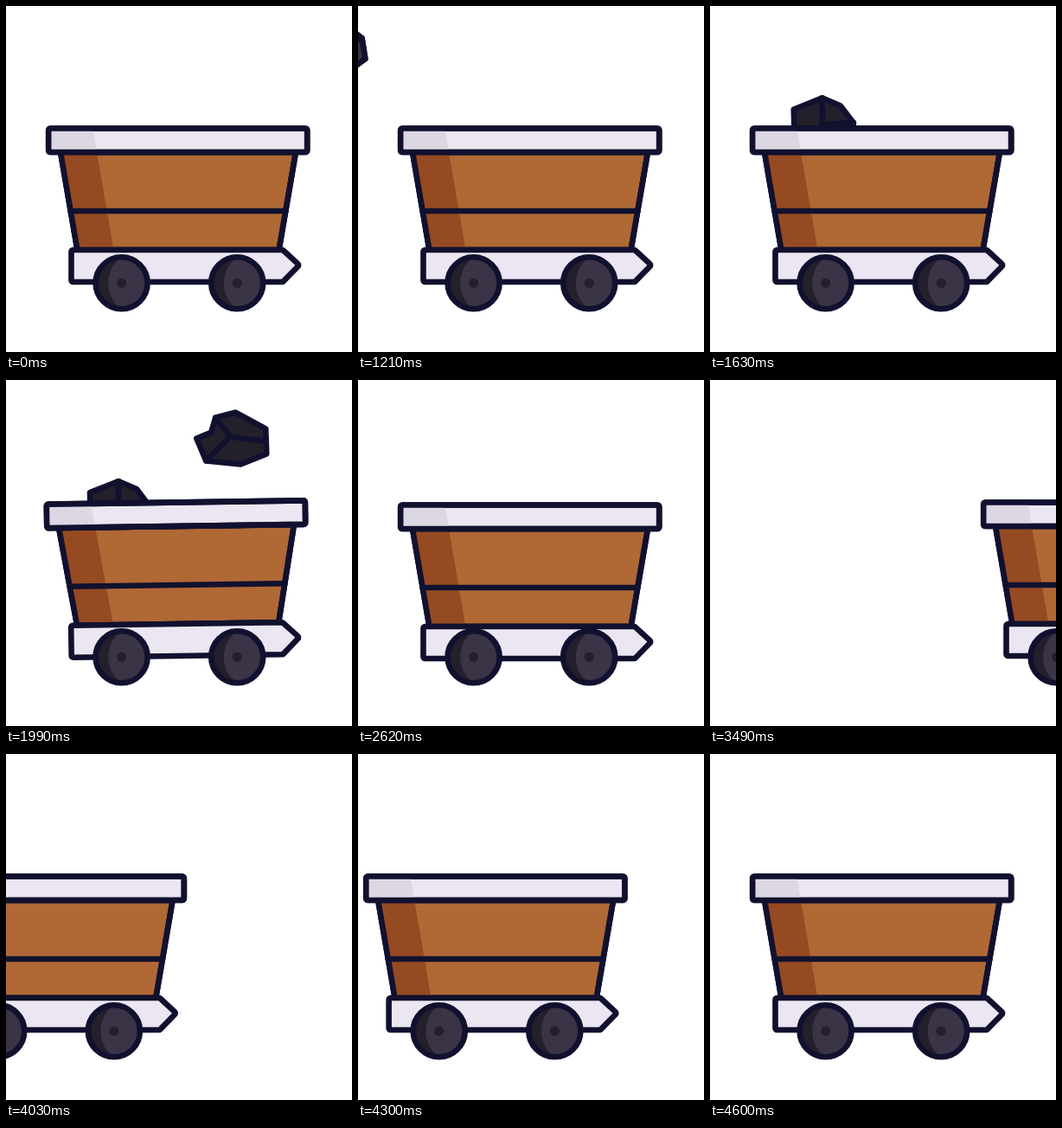
Animation of 400 by 400 pixels, one loop 4630 ms. Source, as an HTML page with a canvas:

```html
<!DOCTYPE html>
<html lang="en">
<head>
<meta charset="utf-8">
<title>Mine cart</title>
<style>
html, body { margin: 0; width: 100%; height: 100%; overflow: hidden; background: #fff; }
canvas { display: block; width: 100vmin; height: 100vmin; }
</style>
</head>
<body>
<canvas></canvas>
<script>
const LOOP = 4630;
const INK = '#11112f', PALE = '#ebe6f1', PALE_SHADE = '#ddd7e4';
const WOOD = '#b06835', WOOD_SHADE = '#964a22';
const COAL = '#231f2b', IRON = '#3b3346';

// Cart layout: heights of the main edges and the width of the shaded strip.
const RIM_TOP = 141.5, RIM_BOTTOM = 169, PLANK = 237, BASE_TOP = 282, BASE_BOTTOM = 319;
const MIDDLE = 199, SHADE = 42;

// Coal flight: time in the air and height where it settles.
const FLIGHT = 432, REST_Y = 150;

const canvas = document.querySelector('canvas');
const ctx = canvas.getContext('2d');
const scale = Math.min(3, window.devicePixelRatio || 1);
canvas.width = canvas.height = 400 * scale;

const clamp = u => Math.max(0, Math.min(1, u));
const mix = (a, b, u) => a + (b - a) * u;
const ease = (t, from, to) => {
  const u = clamp((t - from) / (to - from));
  return u * u * (3 - 2 * u);
};

// Closed polygon with optional rounded corners.
function polygon(points, color, { radius = 0, line = true } = {}) {
  const [ax, ay] = points[0], [bx, by] = points.at(-1);
  ctx.beginPath();
  ctx.moveTo((ax + bx) / 2, (ay + by) / 2);
  points.forEach(([x, y], i) => ctx.arcTo(x, y, ...points[(i + 1) % points.length], radius));
  ctx.closePath();
  ctx.fillStyle = color;
  ctx.fill();
  if (line) ctx.stroke();
}

function segment([x0, y0], [x1, y1]) {
  ctx.beginPath();
  ctx.moveTo(x0, y0);
  ctx.lineTo(x1, y1);
  ctx.stroke();
}

function ellipse(x, y, rx, ry, color) {
  ctx.beginPath();
  ctx.ellipse(x, y, rx, ry, 0, 0, Math.PI * 2);
  ctx.fillStyle = color;
  ctx.fill();
}

// Ridges run from the hub to corners; a half means the middle of an edge.
const leftRock = {
  corners: [[-33, -20], [0, -33], [21, -24], [36, -4], [34, 20], [5, 32], [-32, 22]],
  hub: [0, -2], ridges: [1, 3, 5], lit: true
};
const rightRock = {
  corners: [[-19, -25], [4, -31], [39, -12], [40, 17], [10, 29], [-30, 25], [-41, -1], [-24, -8]],
  hub: [-2, -3], ridges: [0, 2.5, 5]
};

function drawRock({ corners, hub, ridges, lit }, x, y, angle = 0) {
  const along = i => {
    const a = corners[Math.floor(i)], b = corners[Math.ceil(i)];
    return [(a[0] + b[0]) / 2, (a[1] + b[1]) / 2];
  };
  ctx.save();
  ctx.translate(x, y);
  ctx.rotate(angle);
  polygon(corners, COAL);
  if (lit) polygon([hub, ...corners.slice(ridges[1], ridges[2] + 1)], IRON);
  ridges.forEach(i => segment(hub, along(i)));
  ctx.restore();
}

function throwRock(rock, age, x0, x1, sunk, spin) {
  if (age < 0) return;
  const u = clamp(age / FLIGHT);
  const arc = 50 - 0.317 * age + 0.001257 * age * age;
  const x = mix(x0, x1, Math.sin(u * Math.PI / 2));
  drawRock(rock, x, Math.min(REST_Y, arc) + sunk, spin * (1 - u));
}

function dropRock(rock, age, x) {
  if (age < 0) return;
  drawRock(rock, x, Math.min(215, -40 + 0.55 * age + 0.0019 * age * age));
}

function drawRocks(t) {
  if (t > 2700) return;
  const sunk = 65 * ease(t, 2340, 2500);
  throwRock(leftRock, t - 1210, -30, 130, sunk, -0.24);
  throwRock(rightRock, t - 1690, 431, 240, sunk, 0);
  dropRock(rightRock, t - 2140, 195);
}

// The left wall leans inward; the right one mirrors it.
const leftWall = y => 63 + (y - RIM_BOTTOM) * 0.172;
const rightWall = y => 2 * MIDDLE - leftWall(y);
const shadeEdge = y => leftWall(y) + SHADE;
const band = (left, right, top, bottom) =>
  [[left(top), top], [right(top), top], [right(bottom), bottom], [left(bottom), bottom]];

function drawBody() {
  const rimLeft = () => 49.2, rimRight = () => 348.2;
  const flat = { line: false };

  polygon(band(leftWall, rightWall, RIM_BOTTOM, BASE_TOP), WOOD);
  polygon(band(leftWall, shadeEdge, RIM_BOTTOM, BASE_TOP), WOOD_SHADE, flat);
  polygon(band(leftWall, rightWall, RIM_BOTTOM, BASE_TOP), 'transparent');
  segment([leftWall(PLANK), PLANK], [rightWall(PLANK), PLANK]);

  const rim = band(rimLeft, rimRight, RIM_TOP, RIM_BOTTOM);
  polygon(rim, PALE, { radius: 2 });
  polygon(band(rimLeft, shadeEdge, RIM_TOP, RIM_BOTTOM), PALE_SHADE, flat);
  polygon(rim, 'transparent', { radius: 2 });

  const nose = [339, (BASE_TOP + BASE_BOTTOM) / 2 - 1];
  polygon([[75.5, BASE_TOP], [320, BASE_TOP], nose, [320, BASE_BOTTOM], [75.5, BASE_BOTTOM]],
    PALE, { radius: 2 });
}

function drawWheel(x) {
  const y = 320.3, r = 30;
  ellipse(x, y, r, r, COAL);
  ctx.save();
  ctx.clip();
  ellipse(x + 12.5, y, 28, 33, IRON);
  ctx.restore();
  ellipse(x, y, r, r, 'transparent');
  ctx.stroke();
  ellipse(x, y, 5.6, 5.6, COAL);
}

// Leans to the first rock, swings to the second, then levels out.
const tilt = t => -0.037 * (ease(t, 1620, 1870) - 2 * ease(t, 1870, 2200) + ease(t, 2200, 2410));
const dip = t => 3.2 * (ease(t, 2370, 2600) - ease(t, 2600, 2760));

// One eased run that leaves on the right and comes back from the left.
function cartShift(t) {
  const run = 700 * ease(t, 2708, 4571);
  return run > 350 ? run - 700 : run;
}

function draw(t) {
  ctx.setTransform(scale, 0, 0, scale, 0, 0);
  ctx.fillStyle = '#fff';
  ctx.fillRect(0, 0, 400, 400);
  ctx.strokeStyle = INK;
  ctx.lineWidth = 6.6;
  ctx.lineJoin = ctx.lineCap = 'round';

  drawRocks(t);
  ctx.translate(cartShift(t), 0);
  ctx.save();
  ctx.translate(MIDDLE, 305 + dip(t));
  ctx.rotate(tilt(t));
  ctx.translate(-MIDDLE, -305);
  drawBody();
  ctx.restore();
  [133.6, 267.2].forEach(drawWheel);
}

const begin = performance.now();
function tick() {
  draw((performance.now() - begin) % LOOP);
  requestAnimationFrame(tick);
}
tick();
</script>
</body>
</html>
```
